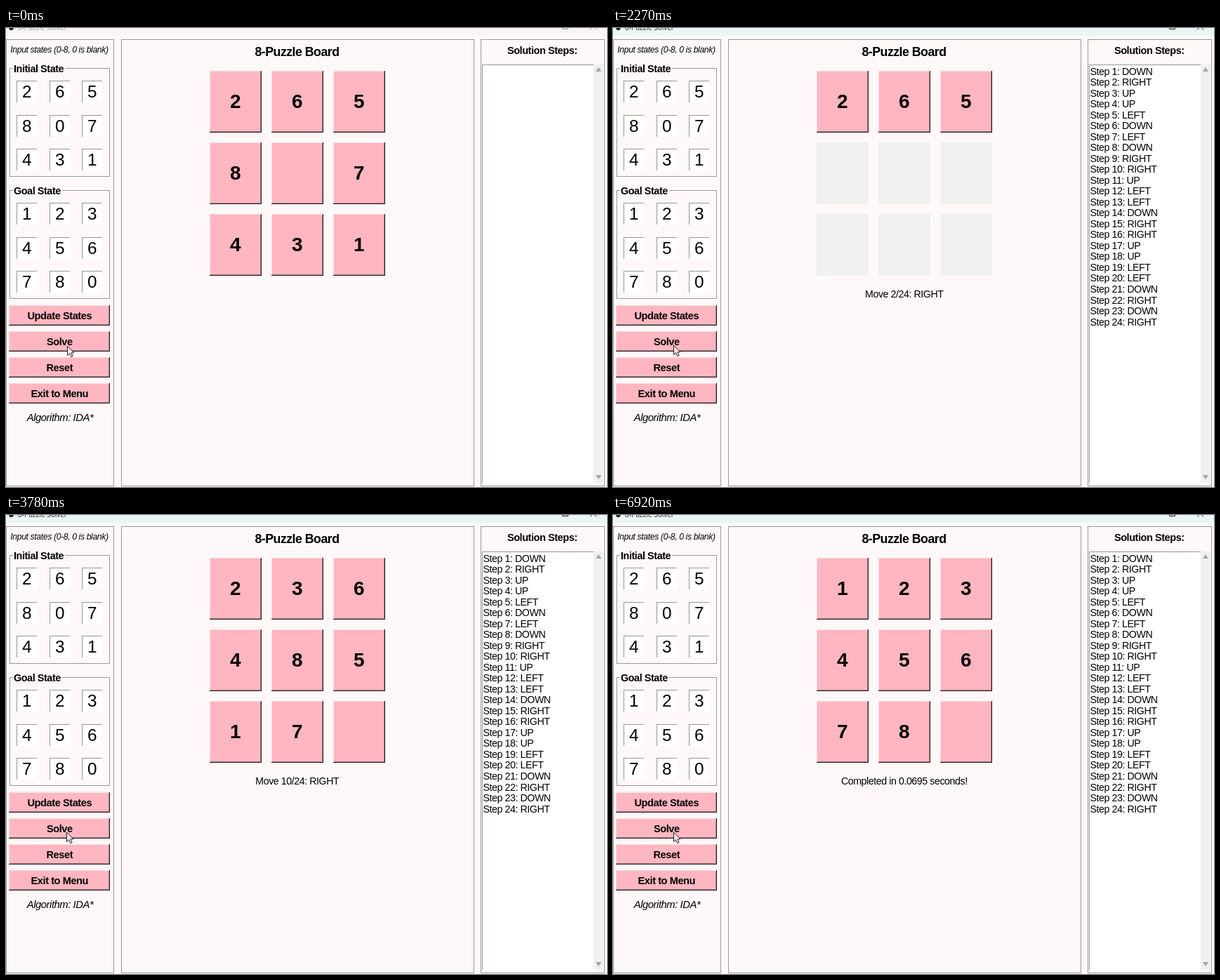
Animation, 856 px wide and 654 px high, one loop 9130 ms. Source, as an HTML page:

```html
<!DOCTYPE html>
<html lang="en">
<head>
<meta charset="utf-8">
<title>8-Puzzle Solver</title>
<style>
  html, body { margin: 0; width: 100%; height: 100%; overflow: hidden; background: #fff8f8; }
  svg { display: block; width: 856px; height: 654px; font-family: "Liberation Sans", Arial, sans-serif; }
  rect { shape-rendering: crispEdges; }
  text { letter-spacing: -.03em; }
  .b { font-weight: bold; }
  .i { font-style: italic; }
  .bar { font-family: "Open Sans", sans-serif; letter-spacing: 0; }
</style>
</head>
<body>
<svg viewBox="0 0 856 654"><g id="fixed"></g><g id="live"></g></svg>
<script>
const LOOP = 9130, BG = '#fff8f8', PINK = '#ffb6c1', GREY = '#f0f0f0', DARK = '#999595';
const START = '265807431', GOAL = '123456780';
const MOVES = 'DRUULDLDRRULLDRRUULLDRDR';
const NAMES = { U: 'UP', D: 'DOWN', L: 'LEFT', R: 'RIGHT' };
const SHIFT = { U: -3, D: 3, L: -1, R: 1 };
const MOVE_TIMES = [1870, 2070, 2370, 2580, 2780, 2980, 3180, 3380, 3580, 3780, 3980, 4190,
  4390, 4600, 4800, 5000, 5200, 5500, 5710, 5910, 6110, 6310, 6520, 6720];
const ACTIVE = 360, PRESS = 460, RELEASE = 660, SOLVED = 760, NUDGE = 860;
const REDRAW = [2270, 2370], DONE = 6920;

const rect = (x, y, w, h, fill) => `<rect x="${x}" y="${y}" width="${w}" height="${h}" fill="${fill}"/>`;
const text = (s, x, y, size, cls = '', anchor = 'middle', fill = '#000') =>
  `<text x="${x}" y="${y}" font-size="${size}" class="${cls}" text-anchor="${anchor}" fill="${fill}">${s}</text>`;

// One-pixel edges: top and left in one colour, bottom and right in another
const edges = (x, y, w, h, tl, br) =>
  rect(x, y, w, 1, tl) + rect(x, y, 1, h, tl) +
  rect(x, y + h - 1, w, 1, br) + rect(x + w - 1, y, 1, h, br);

const groove = (x, y, w, h) =>
  edges(x, y, w, h, DARK, '#fff') + edges(x + 1, y + 1, w - 2, h - 2, '#fff', DARK);

const raised = (x, y, w, h) => rect(x, y, w, h, PINK) +
  edges(x + 1, y + 1, w - 2, h - 2, PINK, '#b58089') +
  edges(x, y, w, h, '#ffdbe0', '#1f1a1b');

const sunken = (x, y, w, h) => rect(x, y, w, h, GREY) + edges(x, y, w, h, '#696969', '#fff');

function stateBox(label, state, y, gap) {
  let s = groove(5, y, 144, 156) + rect(10, y - 2, gap, 5, BG) + text(label, 11, y + 5.5, 14.4, 'b', 'start');
  [...state].forEach((d, k) => {
    const x = Math.round(15 + k % 3 * 46.6), top = Math.round(y + 18.3 + Math.floor(k / 3) * 48.2);
    s += rect(x, top, 29, 31, '#fff') + rect(x, top, 29, 1, DARK) + rect(x, top, 1, 31, DARK) +
      text(d, x + 14.5, top + 24.3, 24.3);
  });
  return s;
}

const button = (label, y, down) => (down ? sunken : raised)(4, y, 144, 29) +
  text(label, 76.3 + down, y + 20 + down, 14.6, 'b');

const fixed = groove(0, 16, 155, 638) + groove(164, 16, 504, 638) + groove(676, 16, 178, 638) +
  text('Input states (0-8, 0 is blank)', 76, 35, 12.2, 'i') +
  stateBox('Initial State', START, 57, 74) + stateBox('Goal State', GOAL, 231, 70) +
  button('Update States', 395, 0) + button('Reset', 469, 0) + button('Exit to Menu', 506, 0) +
  text('Algorithm: IDA*', 77, 560, 14.8, 'i') +
  text('8-Puzzle Board', 414.5, 39.5, 17.8, 'b') + text('Solution Steps:', 763.8, 37.3, 14.5, 'b') +
  rect(678, 52, 159, 596, '#fff') + rect(678, 52, 159, 1, DARK) + rect(678, 52, 1, 596, DARK) +
  rect(837, 52, 14, 596, GREY) +
  '<path d="M840 62l4-6 4 6zM840 637l4 6 4-6z" fill="#a3a3a3"/>';

function titleBar(active) {
  const ink = active ? '#222' : '#999';
  return rect(0, 0, 856, 11, active ? '#e8f7f4' : '#f8f4f6') +
    '<circle cx="7.5" cy="0" r="3.2" fill="#222"/>' +
    text('8-Puzzle Solver', 17, 3, 10, 'bar', 'start', ink) +
    `<path d="M792.5 -5V1.5H800.5V-5M832 2.500L841 -6.500M832 -6.500L841 2.500" fill="none" stroke="${ink}"/>`;
}

function boardAfter(count) {
  const cells = [...START];
  for (const m of MOVES.slice(0, count)) {
    const from = cells.indexOf('0'), to = from + SHIFT[m];
    cells[from] = cells[to];
    cells[to] = '0';
  }
  return cells;
}

function board(count, redrawing) {
  return boardAfter(count).map((d, k) => {
    const row = Math.floor(k / 3), x = 290 + k % 3 * 88, y = [61, 163, 265][row];
    if (redrawing && row) return rect(x, y, 74, 88, GREY);
    return raised(x, y, 74, 88) + (d === '0' ? '' : text(d, x + 36.4, y + 53.3, 28, 'b'));
  }).join('');
}

function status(t, count) {
  if (t < SOLVED) return '';
  if (t >= DONE) return 'Completed in 0.0695 seconds!';
  if (!count) return 'Solution found in 0.0695 seconds!';
  return `Move ${count}/${MOVES.length}: ${NAMES[MOVES[count - 1]]}`;
}

const steps = [...MOVES].map((m, k) =>
  text(`Step ${k + 1}: ${NAMES[m]}`, 679.5, 66.6 + k * 15.52, 14.2, '', 'start')).join('');

function cursor(t) {
  const [x, y] = t < NUDGE ? [87, 453] : [86, 452];
  return `<path transform="translate(${x} ${y})" d="M.5 0V13.500l3-2.800 2.300 5 2.300-1-2.200-4.900H10z"
    fill="#ffe3e7" stroke="#2a2226"/>`;
}

function scene(t) {
  const count = MOVE_TIMES.filter(m => m <= t).length;
  const down = t >= PRESS && t < RELEASE ? 1 : 0;
  return titleBar(t >= ACTIVE) + button('Solve', 432, down) +
    board(count, t >= REDRAW[0] && t < REDRAW[1]) +
    text(status(t, count), 414.8, 383.6, 14.2) +
    (t >= SOLVED ? steps : '') + cursor(t);
}

document.getElementById('fixed').innerHTML = fixed;
const live = document.getElementById('live');
const origin = performance.now();
let shown = '';

function tick() {
  const next = scene((performance.now() - origin) % LOOP);
  if (next !== shown) live.innerHTML = shown = next;
  requestAnimationFrame(tick);
}
tick();
</script>
</body>
</html>
```
